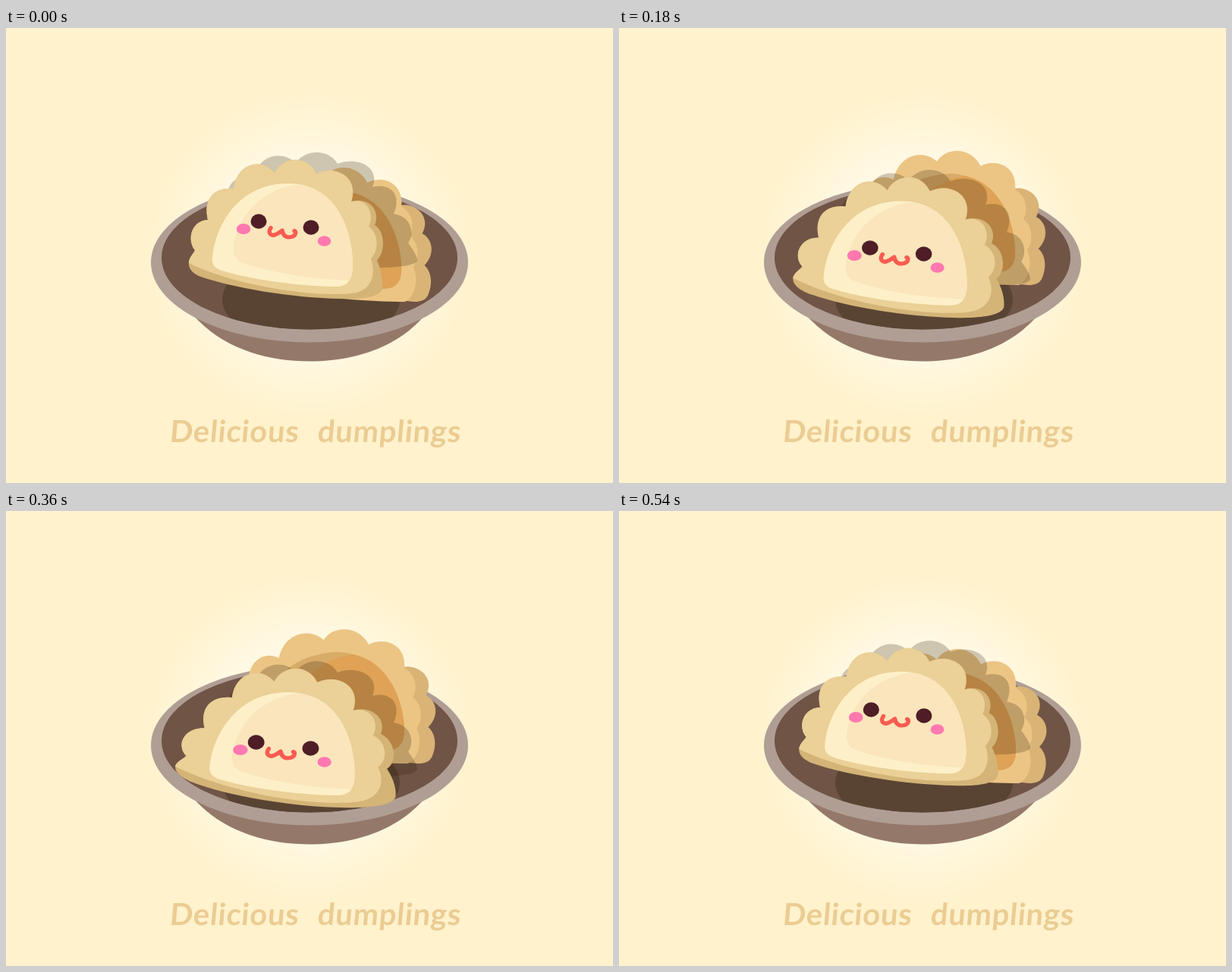
Animation of 800 by 600 pixels, one loop 0.6 s. Source, as an HTML page:

```html
<!DOCTYPE html>
<html lang="en">
<head>
<meta charset="utf-8">
<title>Delicious dumplings</title>
<style>
  html, body { margin: 0; width: 100%; height: 100%; overflow: hidden; background: #fff2cc; }
  svg { display: block; width: 100%; height: 100%; }
  text { font: 700 40px Lato, sans-serif; letter-spacing: .7px; word-spacing: 14px; fill: #ebcc93; }
</style>
</head>
<body>
<svg viewBox="0 0 800 600">
  <defs>
    <radialGradient id="halo">
      <stop offset="0" stop-color="#fffdf2"/>
      <stop offset=".6" stop-color="#fff8e2"/>
      <stop offset="1" stop-color="#fff2cc"/>
    </radialGradient>
    <clipPath id="hollow"><ellipse cx="400" cy="303" rx="195" ry="94.500"/></clipPath>
    <clipPath id="faceClip"><path id="faceEdge"/></clipPath>
  </defs>

  <circle cx="400" cy="300" r="222" fill="url(#halo)"/>

  <!-- bowl -->
  <path d="M249,381 C288,424 346,439.500 400,439.500 C454,439.500 512,424 550,381Z" fill="#94796a"/>
  <ellipse cx="400" cy="309" rx="209" ry="105.500" fill="#b09e95"/>
  <ellipse cx="400" cy="303" rx="195" ry="94.500" fill="#705446"/>
  <ellipse cx="402" cy="358" rx="117" ry="60" fill="#594434" clip-path="url(#hollow)"/>

  <!-- back dumpling -->
  <g id="back">
    <path fill="#d9b476" d="M520,203 C540,198 564,216 551,240 C566,248 568,268 554,282
      C563,290 565,304 560,318 C557,328 550,330 540,330 L500,326Z"/>
    <path fill="#ecc584" d="M322,214 C327,190 346,183 361,191 C368,158 400,150 419,167
      C431,147 465,148 477,173 C497,163 526,172 523,204 C538,213 541,230 534,243
      C546,252 548,270 539,284 C546,298 543,322 528,330 C490,330 440,327 400,320Z"/>
    <path fill="#d8ac68" d="M372,205 C394,188 420,183 440,183 C500,188 524,250 523,290
      C522,307 512,314 495,313 L400,300Z"/>
    <path fill="#dfa256" d="M457,186 C504,196 524,250 523,290 C522,307 512,314 495,313
      L400,300 L392,225 C408,202 430,190 457,186Z"/>
  </g>

  <path id="shade" fill="#2c1c08" fill-opacity=".23"/>

  <!-- front dumpling -->
  <path id="side" fill="#d4b477"/>
  <path id="front" fill="#ebd097"/>
  <path id="face" fill="#fdf0c8"/>
  <path id="cheek" fill="#fae5bc" clip-path="url(#faceClip)"/>
  <g id="look">
    <g fill="#4e1d26">
      <ellipse cx="333" cy="255" rx="10.500" ry="9.700"/>
      <ellipse cx="402" cy="263" rx="10.500" ry="9.700"/>
    </g>
    <g fill="#ff78b0">
      <ellipse cx="313" cy="265" rx="9.300" ry="7"/>
      <ellipse cx="419.500" cy="281" rx="8.800" ry="6.800"/>
    </g>
    <path d="M349,263.500 C344,271 350,274.500 355,272.500 C359,271 361,269 364,267
      C365,274 370,277 376,275.500 C382,274 383,269 380,267.500"
      fill="none" stroke="#fa5b51" stroke-width="5.400" stroke-linecap="round" stroke-linejoin="round"/>
  </g>

  <text transform="translate(215 546) skewX(-5)">Delicious dumplings</text>
</svg>
<script>
  const $ = id => document.getElementById(id);
  const STEP = 60;

  // One column per step of the bounce.
  const topY  = [0, 4, 10, 23, 30, 36, 34, 26, 16, 7];
  const baseY = [0, 6, 14, 25, 34, 39, 34, 25, 14, 5];
  const lookY = [0, 8, 18, 35, 48, 53, 50, 37, 22, 7];
  const wide  = [0, .1, .24, .65, .85, 1.03, 1, .8, .45, .2];
  const backW = [-2, -2, -2, -1, 0, 1, 2, 2, 1, 0];
  const backY = [31, 25, 18, 9, 0, -3, 3, 11, 20, 29];

  const frill = `M241,308 C243,300 247,298 249,293 C238,280 244,254 266,253
    C260,228 272,209 300,212 C304,180 335,169 354,191 C365,169 397,167 409,192
    C434,180 466,196 455,229 `;
  const base = `C380,356 298,343 254,327 C244,322 240,316 241,308Z`;
  const shapes = {
    side: frill + `C478,222 494,240 486,260 C500,268 500,296 489,306
      C494,318 497,332 496,343 C494,355 470,358 440,357 ` + base,
    front: frill + `C474,223 487,243 478,262 C491,270 492,293 481,304
      C488,325 482,348 455,350 C400,355 300,339 241,310Z`,
    face: `M272,303 C274,270 300,205 372,205 C440,205 457,275 457,312
      C457,333 450,342 432,341 C380,340 320,331 285,320 C275,317 271,312 272,303Z`,
    cheek: `M388,206 C335,211 303,252 300,290 C300,302 305,308 316,311
      C350,322 400,332 460,333 L470,200Z`
  };
  const shade = frill + `C478,222 494,240 483,272 C508,276 510,305 502,318
    C508,328 514,338 514,346 C510,357 470,358 440,357 ` + base;

  const mapPath = (d, fn) => d.replace(/([\d.]+),([\d.]+)/g,
    (m, x, y) => fn(+x, +y).map(v => v.toFixed(2)).join());

  // Squash: the base spreads sideways while the body sinks.
  function squash(x, y, i, k) {
    const d = x - 369;
    const edge = Math.max(0, (Math.abs(d) - 95) / 33) * Math.min(1, y / 310) ** 4;
    const drop = topY[i] + (baseY[i] - topY[i]) * (y - 174) / 182;
    const lift = d < 0 ? 7 * k * edge : 0;
    return [x + k * d * (.03 + .11 * edge), y + drop - lift];
  }

  function draw(i) {
    const k = wide[i];
    for (const id in shapes)
      $(id).setAttribute('d', mapPath(shapes[id], (x, y) => squash(x, y, i, k)));
    $('faceEdge').setAttribute('d', $('face').getAttribute('d'));

    const top = 174 + topY[i];
    $('shade').setAttribute('d', mapPath(shade, (x, y) => {
      const [sx, sy] = squash(x, y, i, 0);
      return [sx + 28, top - 10 + (sy - top) * .83];
    }));
    $('back').setAttribute('transform',
      `translate(430 ${backY[i]}) scale(${1 + .01 * backW[i]} 1) translate(-430 0)`);
    $('look').setAttribute('transform',
      `translate(${366 - 2 * k} ${lookY[i]}) scale(${1 + .04 * k} 1) translate(-366 0)`);
  }

  let shown = -1;
  function tick() {
    const i = Math.floor(performance.now() / STEP) % topY.length;
    if (i !== shown) draw(shown = i);
    requestAnimationFrame(tick);
  }
  tick();
</script>
</body>
</html>
```
